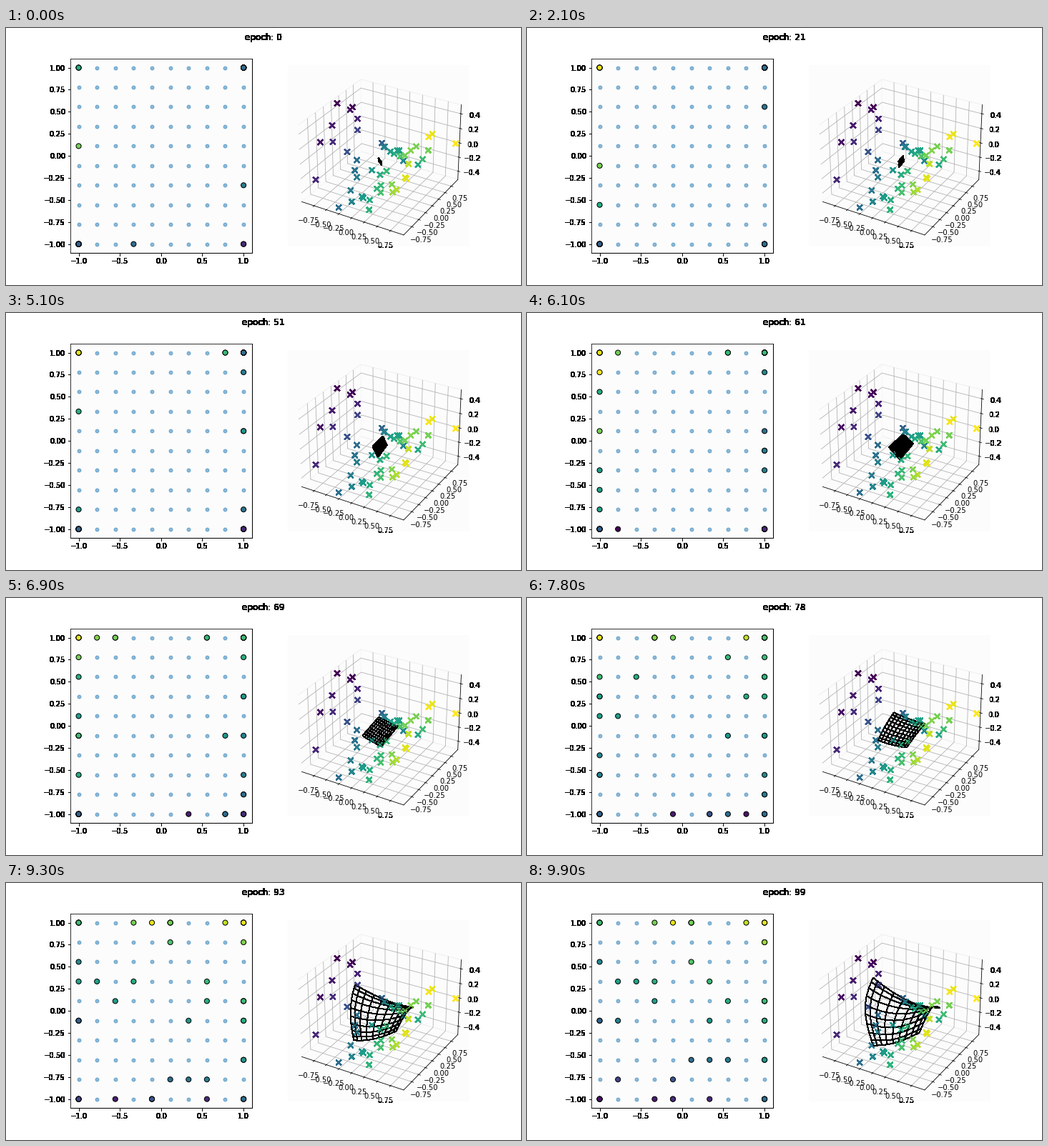
A matplotlib script that plays this animation: 720x360 px, repeating every 10000 ms.

```python
import numpy as np
import matplotlib.pyplot as plt
from matplotlib.animation import FuncAnimation

EPOCHS, SIDE, SAMPLES = 100, 10, 50
SIGMA_MAX, SIGMA_MIN = 3.0, 0.5
ELEV, AZIM = np.radians([30, -60])
PAPER = "#fcfcfc"

plt.rcParams.update({
    "font.family": "DejaVu Sans",
    "font.size": 10,
    "figure.subplot.bottom": 0.125,
})


def sq_dist(a, b):
    return ((a[:, None] - b[None]) ** 2).sum(axis=2)


def saddle(n):
    x = np.random.rand(n) * 2 - 1
    y = np.random.rand(n) * 2 - 1
    return np.column_stack([x, y, 0.5 * (x**2 - y**2)])


def fit_som(data, nodes, latent):
    """Batch SOM; returns the mapped nodes and the winners of every epoch."""
    def smooth(latent, sigma):
        h = np.exp(-sq_dist(nodes, latent) / (2 * sigma**2))
        return h @ data / h.sum(axis=1, keepdims=True)

    def match(mapped):
        return nodes[sq_dist(data, mapped).argmin(axis=1)]

    latent = match(smooth(latent, SIGMA_MAX))
    history = []
    for epoch in range(EPOCHS):
        sigma = SIGMA_MAX + (SIGMA_MIN - SIGMA_MAX) * epoch / EPOCHS
        mapped = smooth(latent, sigma)
        latent = match(mapped)
        history.append((mapped.reshape(SIDE, SIDE, 3), latent))
    return history


def depth_shaded(data, low, high):
    """Viridis by x, fading with distance from the viewer."""
    box = (data - low) / (high - low) * [4, 4, 3]
    eye = [np.cos(ELEV) * np.cos(AZIM), np.cos(ELEV) * np.sin(AZIM), np.sin(ELEV)]
    colors = plt.cm.viridis(plt.Normalize()(data[:, 0]))
    colors[:, 3] = 1 - 0.7 * plt.Normalize()(-box @ eye)
    return colors


def harden(image, dpi):
    """Turn soft edges over the empty background into solid pixels."""
    image[..., 3] = image[..., 3] > 0
    return image, 0, 0


np.random.seed(0)
data = saddle(SAMPLES)
ticks = np.linspace(-1, 1, SIDE)
nodes = np.array([(u, v) for u in ticks for v in ticks])
history = fit_som(data, nodes, np.random.rand(SAMPLES, 2) * 2 - 1)

fig = plt.figure(figsize=(10, 5), dpi=72, facecolor="white")
title = fig.suptitle("epoch: 0")

flat = fig.add_subplot(1, 2, 1, facecolor=PAPER)
flat.scatter(*nodes.T, s=25, alpha=0.5)
winners = flat.scatter(*history[0][1].T, s=50, c=data[:, 0], edgecolors="k")

space = fig.add_subplot(1, 2, 2, projection="3d", facecolor=PAPER)
low, high = data.min(axis=0), data.max(axis=0)
low[2], high[2] = -0.5, 0.5
space.scatter(*data.T, s=50, c=depth_shaded(data, low, high), marker="x",
              depthshade=False)
pad = (high - low) / 48
space.set(
    xlim=(low[0] - pad[0], high[0] + pad[0]),
    ylim=(low[1] - pad[1], high[1] + pad[1]),
    zlim=(low[2] - pad[2], high[2] + pad[2]),
    xticks=np.arange(-3, 4) / 4,
    yticks=np.arange(-3, 4) / 4,
    zticks=np.arange(-2, 3) / 5,
)
space.set_autoscale_on(False)
for axis in (space.xaxis, space.yaxis, space.zaxis):
    axis.set_pane_color(PAPER)
    axis.pane.set_edgecolor("#f0f0f0")

for artist in (title, flat, space):
    artist.set_agg_filter(harden)

wires = []


def update(epoch):
    mapped, latent = history[epoch]
    while wires:
        wires.pop().remove()
    wires.append(space.plot_wireframe(*np.moveaxis(mapped, 2, 0), color="k",
                                      linewidth=1))
    winners.set_offsets(latent)
    title.set_text(f"epoch: {epoch}")


anim = FuncAnimation(fig, update, frames=EPOCHS, interval=100, repeat=True)
plt.show()
```
